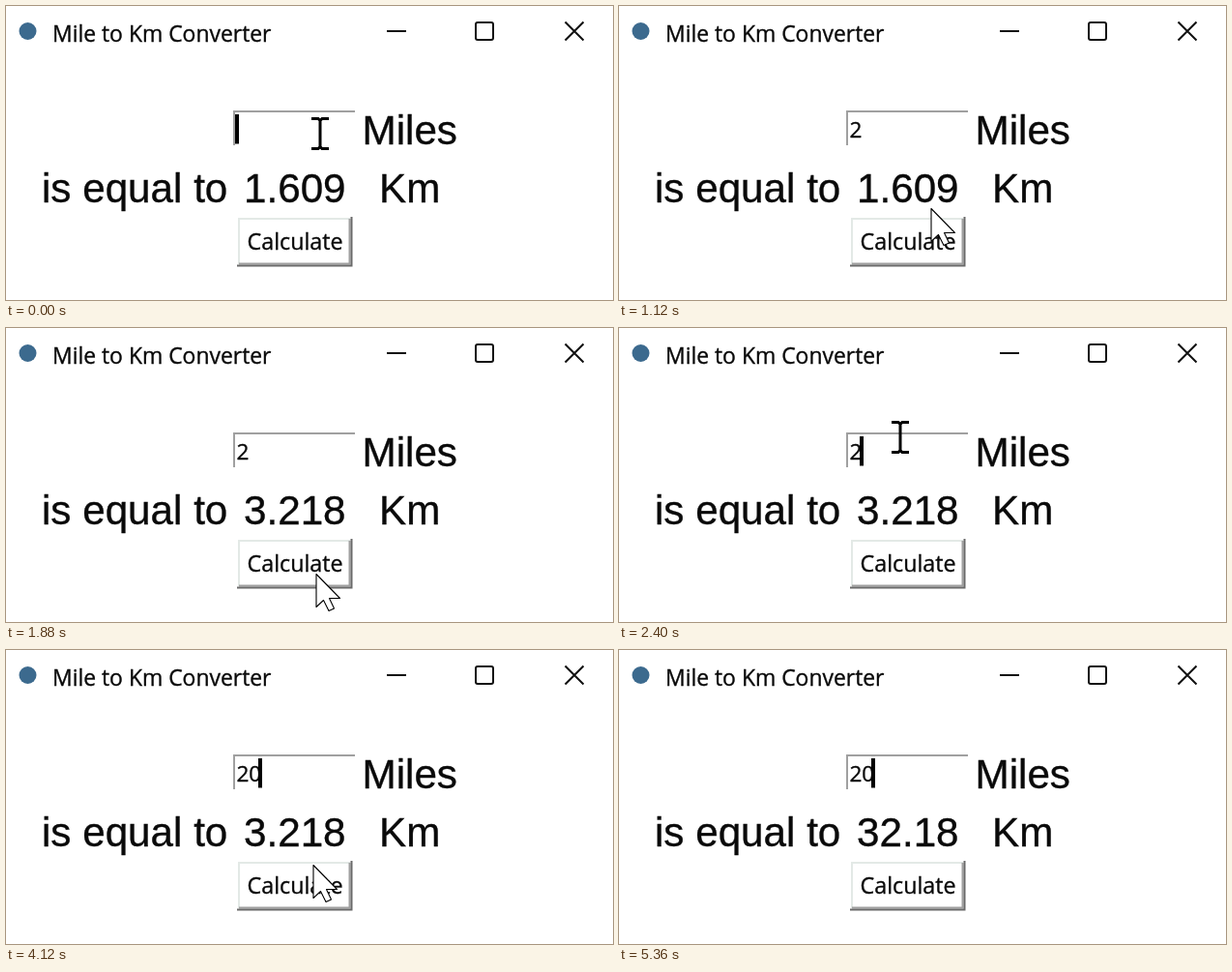
An HTML page that plays this animation: 628 by 304 pixels, repeating every 5440 ms.

```html
<!DOCTYPE html>
<html lang="en">
<head>
<meta charset="utf-8">
<title>Mile to Km Converter</title>
<style>
html, body { margin: 0; width: 100%; height: 100%; overflow: hidden; background: #fff; }
svg { display: block; width: 628px; height: 304px; }
text { white-space: pre; fill: #0a0a0a; stroke: #0a0a0a; stroke-width: .35; }
.ui { font-family: "Open Sans", "Noto Sans", sans-serif; }
.big { font: 42.2px "Liberation Sans", Arial, sans-serif; }
.line { fill: none; stroke: #111; stroke-width: 2; }
</style>
</head>
<body>
<svg viewBox="0 0 628 304">
  <rect width="628" height="304" fill="#fff"/>

  <circle cx="22.5" cy="26" r="9" fill="#3c6a8e"/>
  <text class="ui" x="48" y="37" font-size="22.9">Mile to Km Converter</text>
  <path class="line" d="M394 26H414"/>
  <rect class="line" x="486" y="17" width="18" height="18" rx="2"/>
  <path class="line" d="M578.5 16.5L597.5 35.5M597.5 16.5L578.5 35.5"/>

  <path d="M236 144V109H361" fill="none" stroke="#a0a0a0" stroke-width="2"/>
  <text class="ui" id="entry" x="238.5" y="135.5" font-size="22.5"></text>
  <rect id="caret" y="112" width="4" height="30.5"/>

  <text class="big" x="368.5" y="143">Miles</text>
  <text class="big" x="37" y="203">is equal to</text>
  <text class="big" id="result" x="246" y="203"></text>
  <text class="big" x="386" y="203">Km</text>

  <g id="raised" fill="none" stroke-width="2">
    <path d="M241 267V220H356" stroke="#e3e9e6"/>
    <path d="M241 266.5H355.5V220" stroke="#a0a0a0"/>
    <path d="M239 268.5H357.5V218" stroke="#696969"/>
  </g>
  <g id="sunken" fill="none" stroke-width="2">
    <path d="M240 268V219H357" stroke="#a0a0a0"/>
    <path d="M242 266V221H355" stroke="#696969"/>
    <path d="M241 267H356V220" stroke="#e3e9e9"/>
  </g>
  <text class="ui" id="label" x="249.5" y="252" font-size="23.3">Calculate</text>

  <path id="beam" fill="none" stroke="#000" stroke-width="3"
    d="M-9 -15.5H-2L0 -13.5L2 -15.5H9M0 -14V14M-9 15.5H-2L0 13.5L2 15.5H9"/>
  <path id="arrow" fill="#fff" stroke="#000" stroke-width="1.1" stroke-linejoin="round"
    d="M0 -.5V33.5L7.5 26.5L13 37.5L18.5 35L13.5 24.5H24.5Z"/>
</svg>
<script>
const LOOP = 5440;
const el = id => document.getElementById(id);
const [entry, caret, result, raised, sunken, label, beam, arrow] =
  ["entry", "caret", "result", "raised", "sunken", "label", "beam", "arrow"].map(el);

// pointer stops: time, x, y
const stops = [
  [0, 325, 132], [960, 325, 132], [1120, 323, 210], [1320, 322, 232],
  [1480, 321, 255], [1920, 321, 255], [2000, 318, 233], [2400, 291, 113],
  [3640, 291, 113], [4120, 318, 223], [4200, 318, 223], [4360, 320, 242], [LOOP, 320, 242]
];
const hideAt = 5000;
const clicks = [[1480, 1680], [4400, 4720]];
const typed = [240, 3160];

function pointerAt(t) {
  const i = stops.findIndex(s => t < s[0]);
  const [a, b] = [stops[i - 1], stops[i]];
  const k = (t - a[0]) / (b[0] - a[0]);
  return [a[1] + (b[1] - a[1]) * k, a[2] + (b[2] - a[2]) * k];
}

const show = (node, on) => node.setAttribute("visibility", on ? "visible" : "hidden");
const within = (t, [from, to]) => t >= from && t < to;

function caretOn(t) {
  const last = typed.filter(k => k <= t).pop();
  return last === undefined || (t - last) % 900 < 600;
}

function draw(t) {
  const count = typed.filter(k => t >= k).length;
  entry.textContent = "20".slice(0, count);
  caret.setAttribute("x", [237, 249, 261][count]);
  show(caret, caretOn(t));

  const done = clicks.filter(c => t >= c[1]).length;
  result.textContent = ["1.609", "3.218", "32.18"][done];

  const down = clicks.some(c => within(t, c));
  show(raised, !down);
  show(sunken, down);
  label.setAttribute("transform", down ? "translate(2 2)" : "translate(0 0)");

  const [x, y] = pointerAt(t);
  const overEntry = x > 235 && x < 361 && y > 108 && y < 147;
  for (const p of [beam, arrow]) p.setAttribute("transform", `translate(${x} ${y})`);
  show(beam, t < hideAt && overEntry);
  show(arrow, t < hideAt && !overEntry);
}

const start = performance.now();
function tick() {
  const t = (performance.now() - start) % LOOP;
  draw(Math.floor(t / 40) * 40);
  requestAnimationFrame(tick);
}
draw(0);
requestAnimationFrame(tick);
</script>
</body>
</html>
```
